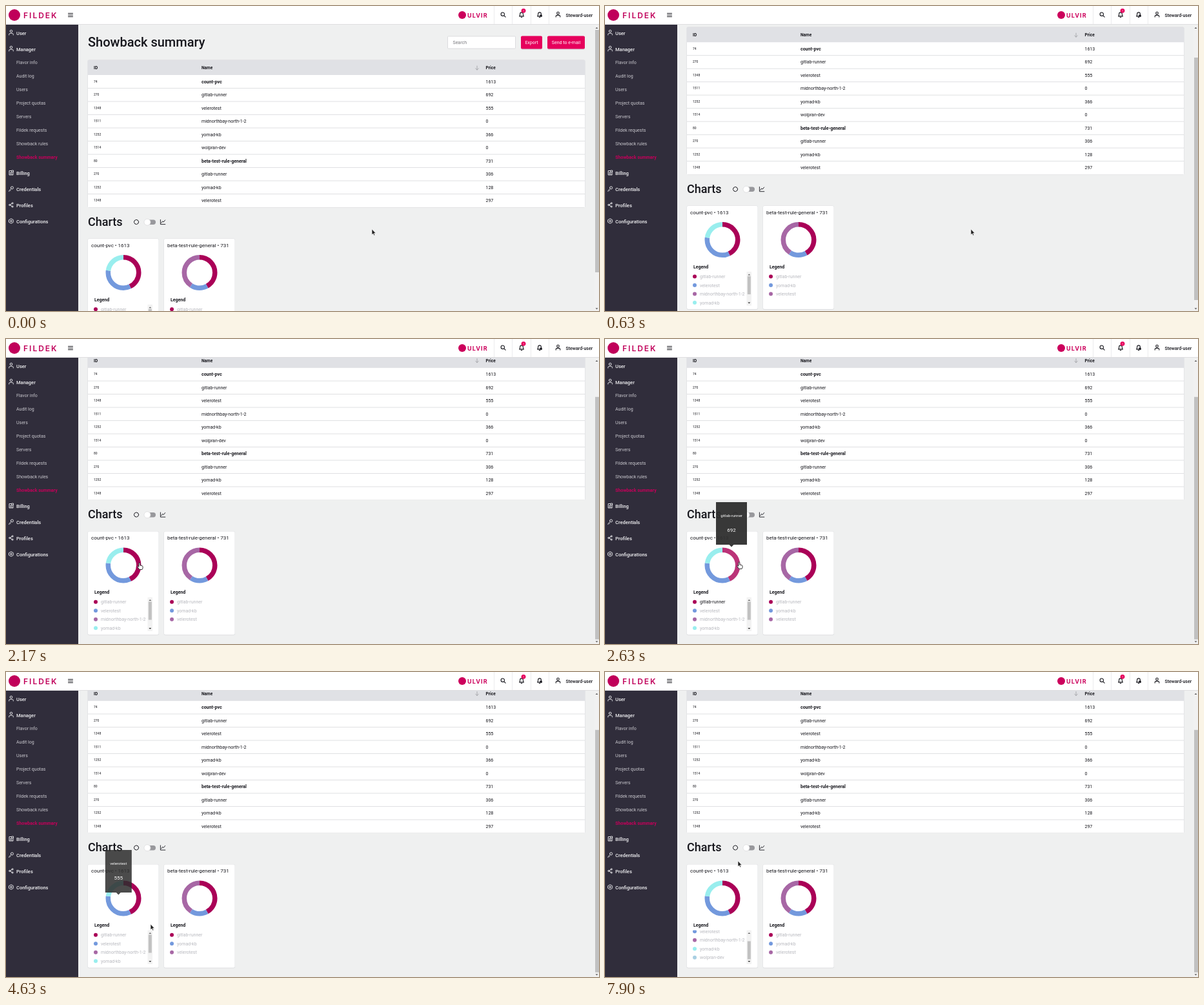
An HTML page that plays this animation: 919x473 px, repeating every 8 s.

```html
<!DOCTYPE html>
<html lang="en">
<head>
<meta charset="utf-8">
<title>Showback summary</title>
<style>
html, body { margin: 0; width: 100%; height: 100%; overflow: hidden; background: #eff0f0; }
svg { display: block; width: 919px; height: 473px; font-family: Roboto, sans-serif; }
.line { fill: none; stroke-linecap: round; stroke-linejoin: round; }
</style>
</head>
<body>
<svg id="stage" viewBox="0 0 919 473"></svg>
<script>
const LOOP = 8000, SCROLL = 62.5;
const INK = '#16161c', PINK = '#e6005c', WINE = '#aa0057', BLUE = '#7399dd',
      CYAN = '#99eeee', PURPLE = '#a767a5', PALE = '#a9cfe2', MUTED = '#b7b8be';

// y is the vertical middle of the line of text
const text = (x, y, s, size = 7, { fill = INK, w = 400, more = '' } = {}) =>
  `<text x="${x}" y="${y + size * 0.355}" font-size="${size}" font-weight="${w}" fill="${fill}" ${more}>${s}</text>`;
const rect = (x, y, w, h, fill, more = '') =>
  `<rect x="${x}" y="${y}" width="${w}" height="${h}" fill="${fill}" ${more}/>`;
const dot = (x, y, r, fill, more = '') =>
  `<circle cx="${x}" cy="${y}" r="${r}" fill="${fill}" ${more}/>`;
const icon = (x, y, d, color = INK, width = 1) =>
  `<path class="line" transform="translate(${x} ${y})" d="${d}" stroke="${color}" stroke-width="${width}"/>`;
const tri = (x, y, dir, fill) =>
  `<path d="M${x - 2} ${y - dir}h4l-2 ${2 * dir}z" fill="${fill}"/>`;

const SHAPES = {
  user: 'M-1.8 -2a1.8 1.8 0 1 0 3.6 0a1.8 1.8 0 1 0 -3.6 0M-3.3 4v-.8q0 -1.8 1.8 -1.8h3q1.8 0 1.8 1.8v.8',
  bill: 'M0 -3h-3v6.5h6v-3.5M1 -3.5h2.5v2.5h-2.5zM-1.5 0h2M-1.5 1.8h3',
  key: 'M-.6 -1.6a2 2 0 1 0 4 0a2 2 0 1 0 -4 0M0 0l-3.2 3.2v.8M-2 2l1 1',
  share: 'M-3.3 0a1.1 1.1 0 1 0 2.2 0a1.1 1.1 0 1 0 -2.2 0M1 -2.6a1.1 1.1 0 1 0 2.2 0a1.1 1.1 0 1 0 -2.2 0M1 2.6a1.1 1.1 0 1 0 2.2 0a1.1 1.1 0 1 0 -2.2 0M-1.2 -.5l2.4 -1.6M-1.2 .5l2.4 1.6',
  gear: 'M-3.2 -1.9l3.2 -1.8l3.2 1.8v3.8l-3.2 1.8l-3.2 -1.8zM-1.2 0a1.2 1.2 0 1 0 2.4 0a1.2 1.2 0 1 0 -2.4 0',
  bell: 'M-3.4 2.4q1 -.8 1 -3.2q0 -2.8 2.4 -2.8t2.4 2.8q0 2.4 1 3.2zM-.8 4h1.6',
  find: 'M-3.4 -.8a2.7 2.7 0 1 0 5.4 0a2.7 2.7 0 1 0 -5.4 0M1.2 1.2l2.4 2.4'
};

function header() {
  let s = rect(0, 0, 919, 28.5, '#fff') + rect(0, 28, 919, 1, '#dedee0');
  s += dot(13, 14, 9, '#c0005a');
  s += text(27, 14.5, 'FILDEK', 12, { fill: '#c0005a', w: 600, more: 'font-family="Inter, sans-serif" letter-spacing="2"' });
  s += icon(100, 14, 'M-3.5 -2.6h7M-3.5 0h7M-3.5 2.6h7');
  s += dot(707, 14, 6, '#cc005c');
  s += text(715, 14.5, 'ULVIR', 9, { fill: '#cc005c', w: 700, more: 'font-family="Inter, sans-serif" letter-spacing="1.1"' });
  for (const x of [756, 784, 813, 841]) s += rect(x, 0, 1, 28, '#ececee');
  s += icon(770.5, 13.5, SHAPES.find, INK, 1.1) + icon(799, 13.5, SHAPES.bell, INK, 1.1);
  s += dot(802, 7.3, 3.4, PINK) + text(801, 7.4, '1', 4, { fill: '#fff' });
  s += icon(827, 13.5, SHAPES.bell, INK, 1.1) + dot(829, 15, 1.8, INK);
  s += icon(855.5, 13, SHAPES.user, INK, 1.1);
  return s + text(867.5, 14.5, 'Steward-user', 7, { w: 500 });
}

function sidebar() {
  const white = '#f2f2f4', heads = [
    [42, 'User', 'user'], [67, 'Manager', 'user'], [259.5, 'Billing', 'bill'],
    [284.5, 'Credentials', 'key'], [309.5, 'Profiles', 'share'], [334.5, 'Configurations', 'gear']];
  const subs = ['Flavor info', 'Audit log', 'Users', 'Project quotas', 'Servers',
    'Fildek requests', 'Showback rules', 'Showback summary'];
  let s = rect(0, 29, 112, 444, '#302d3b');
  for (const [y, name, shape] of heads)
    s += icon(8, y - 1, SHAPES[shape], white, 0.9) + text(16, y, name, 7.5, { fill: white, w: 500 });
  subs.forEach((name, i) => {
    const last = i === subs.length - 1;
    s += text(16, 87.5 + i * 21, name, 7, { fill: last ? '#c4005a' : '#c9c8ce', w: last ? 700 : 400 });
  });
  return s;
}

const button = (x, w, label) =>
  rect(x, 47.5, w, 20, '#b9b9bd', 'rx="2" opacity=".6"') + rect(x, 46.5, w, 20, PINK, 'rx="2"') +
  text(x + w / 2, 56.7, label, 7, { fill: '#fff', more: 'text-anchor="middle"' });

function table() {
  const rows = [[74, 'count-pvc', 1613], [270, 'gitlab-runner', 692], [1348, 'velerotest', 555],
    [1511, 'midnorthbay-north-1-2', 0], [1252, 'yomad-kb', 366], [1514, 'wolpran-dev', 0],
    [80, 'beta-test-rule-general', 731], [270, 'gitlab-runner', 306], [1252, 'yomad-kb', 128], [1348, 'velerotest', 297]];
  let s = rect(126.5, 83.5, 771, 229, '#d9dadd', 'rx="2"') + rect(127, 107, 770, 205, '#fff') + rect(127, 84, 770, 23, '#e0e1e5');
  [[136, 'ID'], [303, 'Name'], [743.5, 'Price']].forEach(([x, name]) => { s += text(x, 96, name, 6.5, { w: 700 }); });
  s += icon(730, 96, 'M0 -3v6M-2.4 .8l2.4 2.3l2.4 -2.3', '#9a9ba0', 0.8);
  rows.forEach(([id, name, price], i) => {
    const y = 117.3 + i * 20.5, w = i % 6 ? 400 : 700;
    if (i) s += rect(127, y - 10.75, 770, 1, '#dfe0e2');
    s += text(136, y - 0.3, id, 5) + text(303, y, name, 7, { w }) + text(743.5, y, price);
  });
  return s;
}

function ring(cx, parts, id) {
  const total = parts.reduce((sum, p) => sum + p[0], 0);
  let start = 0, s = '';
  parts.forEach(([value, color], i) => {
    s += `<circle id="${id}${i}" r="23.75" fill="none" stroke="${color}" stroke-width="7.5" pathLength="${total}"
      stroke-dasharray="${value} ${total}" stroke-dashoffset="${-start}" transform="translate(${cx} 413.5) rotate(-90)"/>`;
    start += value;
  });
  return s;
}

const legend = (x, id, items) => items.map(([name, color], i) =>
  dot(x, 470.3 + i * 13.5, 3, color) +
  text(x + 8, 470.5 + i * 13.5, name, 7, { fill: MUTED, more: `id="${id}${i}"` })).join('');

const card = (x, title) =>
  rect(x - 0.5, 360.5, 110.5, 161.5, '#dfe0e2', 'rx="2.5"') + rect(x, 361, 109.5, 160, '#fff', 'rx="2"') +
  text(x + 5, 371, title, 8) + text(x + 10, 455.3, 'Legend', 7, { w: 700 });

function charts() {
  let s = text(127, 334.5, 'Charts', 18, { w: 500 });
  s += `<circle class="line" cx="202" cy="335" r="3.6" stroke="${INK}" stroke-dasharray="4.6 1"/>`;
  s += rect(215, 331.5, 17, 7.4, '#98989c', 'rx="3.7"') + dot(219, 335.2, 5, '#fff', 'stroke="#d4d4d6" stroke-width=".6"');
  s += icon(243, 335, 'M-3.6 -3.6v7.2h7.4M-2.2 1.4l1.8 -2.6l1.6 1.2l2.4 -3', INK, 0.9);
  s += card(127, 'count-pvc • 1613') + card(245, 'beta-test-rule-general • 731');
  s += ring(182, [[692, WINE], [555, BLUE], [366, CYAN]], 'arc');
  s += ring(300, [[306, WINE], [128, BLUE], [297, PURPLE]], 'side');
  s += `<g clip-path="url(#list)"><g id="items">` + legend(139, 'item', [['gitlab-runner', WINE], ['velerotest', BLUE],
    ['midnorthbay-north-1-2', PURPLE], ['yomad-kb', CYAN], ['wolpran-dev', PALE]]) + '</g></g>';
  s += legend(257, 'other', [['gitlab-runner', WINE], ['yomad-kb', BLUE], ['velerotest', PURPLE]]);
  s += rect(219.5, 463, 7.5, 52.5, '#f2f2f2') + `<g id="thumb">${rect(220.8, 470, 5, 28, '#c1c1c1')}</g>`;
  return s + tri(223.3, 467.5, -1, '#666') + tri(223.3, 511.5, 1, '#333');
}

const tip = (id, x, top, w, name, value) => {
  const mid = 'text-anchor="middle"', fill = '#fff';
  return `<g id="${id}"><path d="M${x - w / 2} ${top}h${w}v66h${3.5 - w / 2}l-3.5 3.5l-3.5 -3.5h${3.5 - w / 2}z" fill="#2f2f2f" opacity=".95"/>` +
    text(x, top + 20.5, name, 6, { fill, more: mid }) + text(x, top + 43.5, value, 8, { fill, more: mid }) + '</g>';
};

stage.innerHTML = `<defs>
  <clipPath id="view"><rect x="112" y="29" width="807" height="444"/></clipPath>
  <clipPath id="list"><rect x="130" y="463" width="89" height="52.5"/></clipPath></defs>` +
  rect(0, 0, 919, 473, '#eff0f0') +
  `<g clip-path="url(#view)"><g id="page">` +
  text(127, 56, 'Showback summary', 20, { w: 500 }) +
  rect(684.5, 47, 105, 19, '#fff', 'stroke="#dcdcdf" rx="1"') + text(692.5, 56.7, 'Search', 7, { fill: '#77777c' }) +
  button(798, 33, 'Export') + button(839, 58, 'Send to e-mail') +
  table() + charts() + '</g></g>' +
  rect(912, 29, 7, 444, '#f1f1f1') + `<g id="bar">${rect(913, 37, 6, 376, '#c1c1c1')}</g>` +
  tri(915.5, 34, -1, '#555') + tri(915.5, 469.5, 1, '#555') +
  sidebar() + header() +
  tip('tipA', 196, 253, 48, 'gitlab-runner', 692) + tip('tipB', 174.3, 276, 41, 'velerotest', 555) +
  `<path id="arrow" d="M0 0v8.8l2 -1.8l1.4 2.9l1.4 -.6l-1.4 -2.8h2.7z" fill="#222" stroke="#fff" stroke-width=".6"/>
  <path id="hand" d="M-1.1 1q0 -1 1 -1t1 1v3l3.2 .8q.9 .3 .9 1.3v2.2l-1 2.2h-4.2l-2.9 -3.8q-.6 -1.3 .7 -1.3l1.3 .9z" fill="#fff" stroke="#222" stroke-width=".9"/>`;

const $ = id => document.getElementById(id);
const clamp = v => Math.max(0, Math.min(1, v));
const ramp = (t, a, b) => clamp((t - a) / (b - a));
const inOut = p => p < 0.5 ? 2 * p * p : 1 - 2 * (1 - p) * (1 - p);
const within = (t, a, b) => t >= a && t < b;
const move = (el, x, y) => el.setAttribute('transform', `translate(${x} ${y})`);

// time, x, y of the pointer's tip
const PATH = [[0, 567, 346], [830, 567, 346], [1130, 440, 352], [1430, 270, 362], [1630, 227, 357], [1930, 207, 347],
  [2130, 207, 347], [2230, 208, 346], [3230, 208, 346], [3530, 204, 361], [3830, 190, 369], [4230, 188, 369],
  [4330, 165, 369], [4430, 165, 369], [4530, 200, 383], [4630, 224, 391], [4830, 236, 410], [5130, 225, 424], [5230, 223, 423],
  [5330, 223, 423], [5630, 222, 433], [5830, 205, 441], [6130, 180, 439], [6930, 180, 439], [7130, 212, 425],
  [7330, 221, 390], [7530, 218, 345], [7630, 213, 315], [7730, 213, 315], [7830, 210, 304], [7900, 206, 293], [8000, 206, 293]];

function pointerAt(t) {
  const i = Math.max(1, PATH.findIndex(k => k[0] >= t));
  const [a, x, y] = PATH[i - 1], [b, u, v] = PATH[i];
  const p = ramp(t, a, b);
  return [x + (u - x) * p, y + (v - y) * p];
}

// the pointer is refreshed ten times a second
const beat = t => t >= 7900 ? 7900 : Math.max(0, Math.floor((t - 30) / 100) * 100 + 30);

function fade(id, t, a, b, c, d) {
  const rise = ramp(t, a, b), o = rise * (1 - ramp(t, c, d));
  $(id).style.opacity = o;
  move($(id), 0, 10 * (1 - inOut(rise)));
}

function draw(t) {
  const off = SCROLL * inOut(ramp(t, 405, 730));
  move($('page'), 0, -off);
  move($('bar'), 0, off * 0.845);

  const drag = inOut(ramp(t, 5370, 5700));
  move($('items'), 0, -19 * drag);
  move($('thumb'), 0, 10 * drag);

  const hot = [within(t, 2200, 3300), within(t, 3600, 4530), false, false, within(t, 6070, 6970)];
  hot.forEach((on, i) => $('item' + i).setAttribute('fill', on ? INK : MUTED));
  [0, 1].forEach(i => $('arc' + i).setAttribute('opacity', hot[i] ? 0.8 : 1));
  fade('tipA', t, 2200, 2560, 3300, 3600);
  fade('tipB', t, 3630, 3980, 4600, 4930);

  const [x, y] = pointerAt(beat(t));
  const hand = within(t, 2170, 4530) || within(t, 6070, 6970);
  $('hand').style.display = hand ? '' : 'none';
  $('arrow').style.display = hand ? 'none' : '';
  move($(hand ? 'hand' : 'arrow'), x, y);
}

const begin = performance.now();
(function tick() {
  draw((performance.now() - begin) % LOOP);
  requestAnimationFrame(tick);
})();
</script>
</body>
</html>
```
